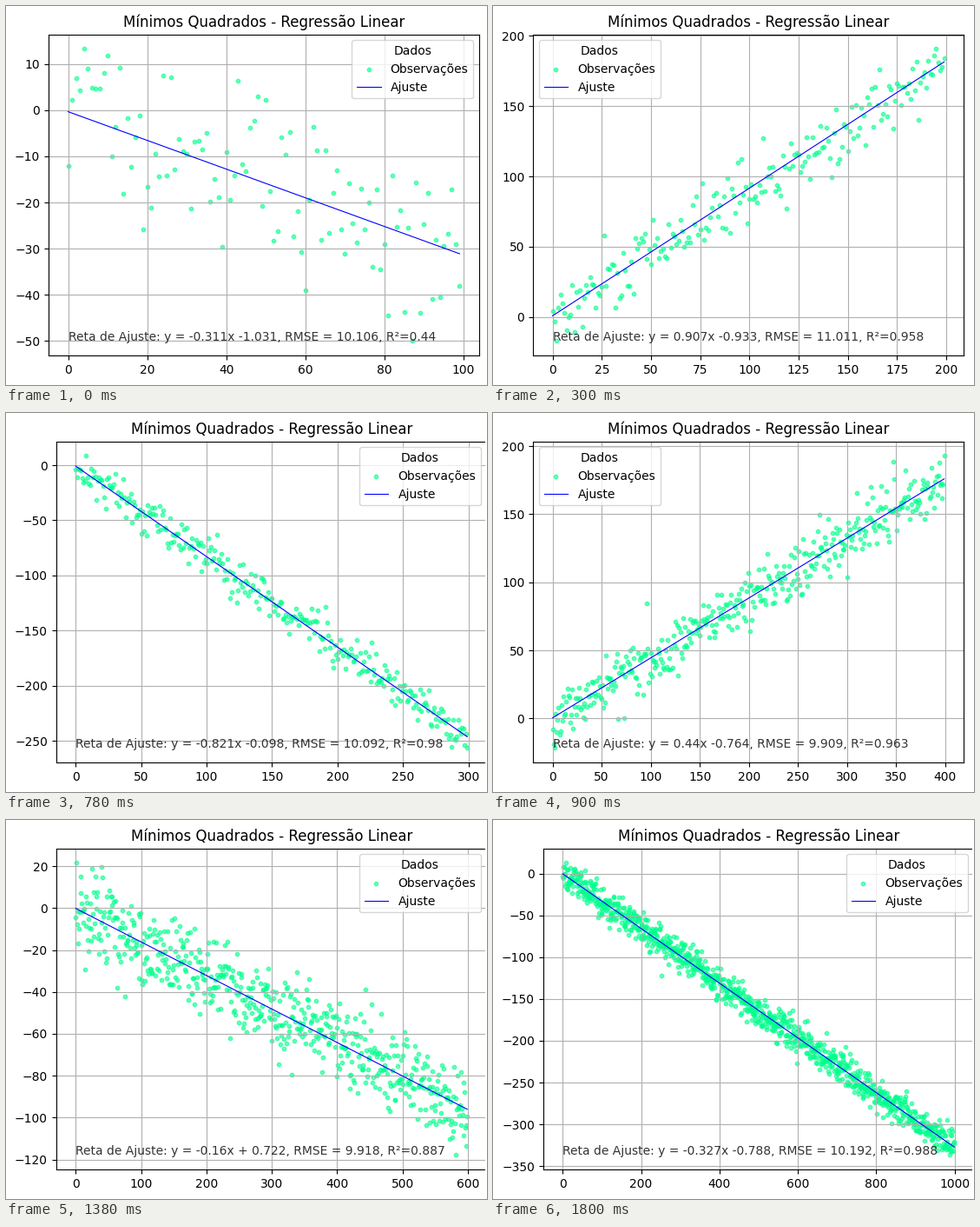
These frames come from a looping animation (554x436 px, 2.1 s). A matplotlib script:

```python
import numpy as np
import matplotlib.pyplot as plt
from matplotlib.animation import FuncAnimation
from matplotlib.patches import Rectangle

W, H, DPI = 554, 436, 100
AX_W, AX_H, AX_BOTTOM = 496, 369.6, 33.88
PAGE_W, PAD = 552, 10
GREEN = "#00ff8c"

# count, slope, intercept, rmse, r2, lowest point, highest point
STAGES = [
    (100, -0.311, -1.031, 10.106, 0.44, (87, -50.0), (4, 13.3)),
    (200, 0.907, -0.933, 11.011, 0.958, (2, -17.0), (195, 190.7)),
    (300, -0.821, -0.098, 10.092, 0.98, (299, -256.5), (8, 8.5)),
    (400, 0.44, -0.764, 9.909, 0.963, (2, -21.7), (399, 192.9)),
    (600, -0.16, 0.722, 9.918, 0.887, (582, -117.83), (1, 21.57)),
    (800, 0.281, -0.587, 10.234, 0.976, (4, -15.2), (793, 237.5)),
    (1000, -0.327, -0.788, 10.192, 0.988, (987, -336.5), (9, 12.7)),
]


def observations(n, slope, rmse, low, high):
    """Noisy line whose extremes are the given points."""
    rng = np.random.default_rng(n)
    y = slope * np.arange(1, n + 1) + rng.normal(0, rmse, n)
    inset = rng.uniform(0, 8, (2, n))
    y = np.clip(y, low[1] + inset[0], high[1] - inset[1])
    for x, value in (low, high):
        y[x] = value
    return y


def equation(slope, intercept, rmse, r2):
    sign = "+ " if intercept > 0 else ""
    return (f"Reta de Ajuste: y = {slope}x {sign}{intercept}, "
            f"RMSE = {rmse}, R²={r2}")


def place_axes(left):
    ax.set_position([left / W, AX_BOTTOM / H, AX_W / W, AX_H / H])


def fit_left():
    """Leave just enough room for the y tick labels."""
    place_axes(60)
    place_axes(60 - ax.yaxis.get_tightbbox().x0 + PAD)


plt.rcParams["font.family"] = "DejaVu Sans"
fig = plt.figure(figsize=(W / DPI, H / DPI), dpi=DPI, facecolor="white")
ax = fig.add_axes([0, 0, 1, 1])
fig.add_artist(Rectangle((PAGE_W / W, 0), 1 - PAGE_W / W, 1,
                         color="white", lw=0, zorder=10))


def draw(i):
    n, slope, intercept, rmse, r2, low, high = STAGES[i]
    x = np.arange(n)
    y = observations(n, slope, rmse, low, high)
    ax.clear()
    ax.scatter(x, y, s=10, color=GREEN, alpha=0.6, label="Observações")
    ax.plot(x, slope * (x + 1), color="blue", lw=0.8, label="Ajuste")
    ax.text(0, y.min(), equation(slope, intercept, rmse, r2), alpha=0.8)
    margin = 0.05 * np.ptp(y)
    ax.set_xlim(-0.05 * (n - 1), 1.05 * (n - 1))
    ax.set_ylim(y.min() - margin, y.max() + margin)
    ax.set_title("Mínimos Quadrados - Regressão Linear")
    ax.grid(True)
    ax.legend(title="Dados", loc="upper left" if slope > 0 else "upper right")
    fit_left()
    return []


anim = FuncAnimation(fig, draw, frames=len(STAGES), init_func=lambda: draw(0),
                     interval=300, repeat=True, repeat_delay=0)
plt.show()
```
